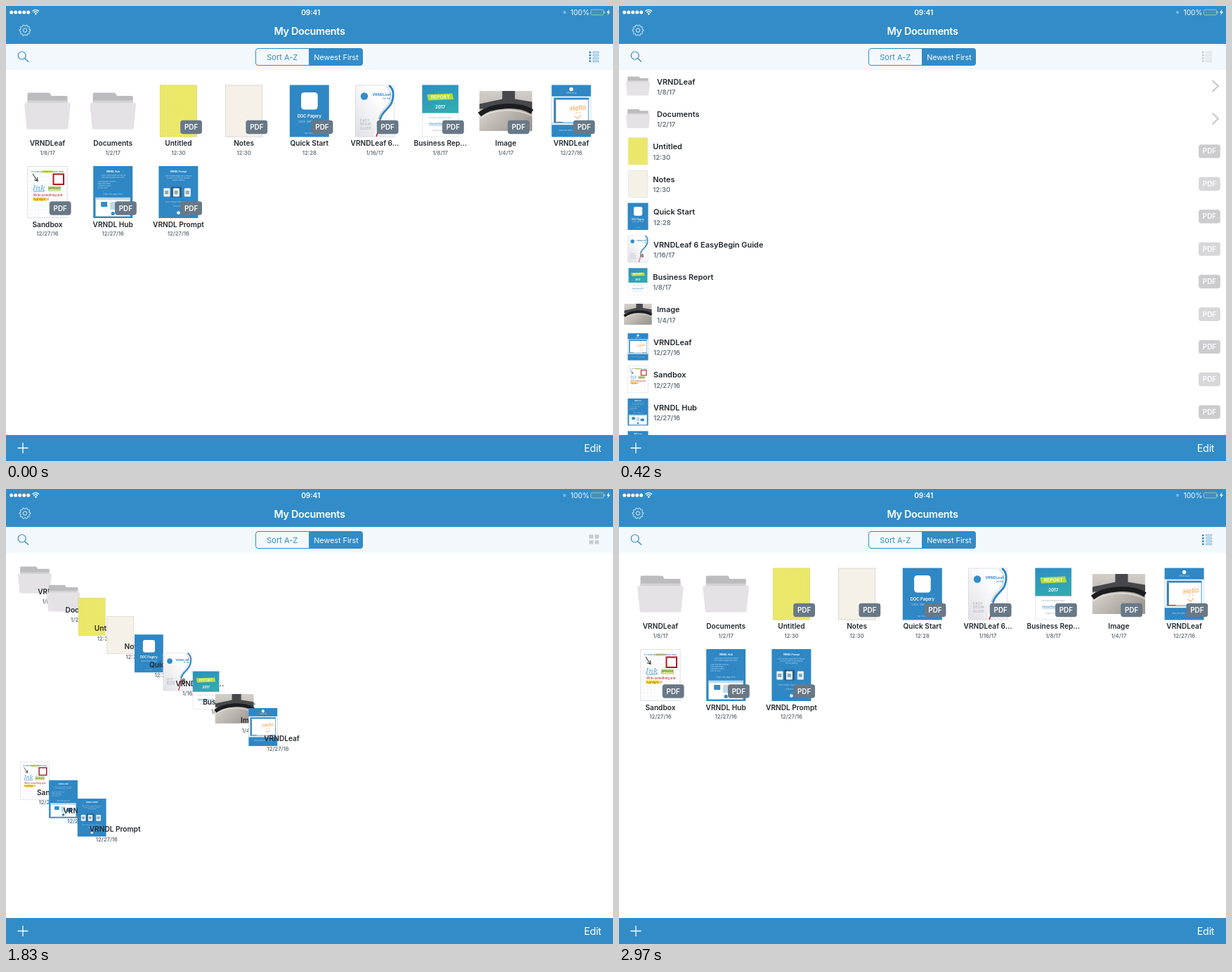
Recreate the animation shown at these times as an HTML page. Size 864 by 648 pixels, loop 3 s.

```html
<!DOCTYPE html>
<html lang="en">
<head>
<meta charset="utf-8">
<title>My Documents</title>
<style>
html, body { margin: 0; width: 100%; height: 100%; overflow: hidden; background: #fff; }
#stage { display: block; width: 864px; height: 648px; font-family: Inter, Roboto, sans-serif; }
.name { font-weight: 600; fill: #24282d; }
.date { font-weight: 600; fill: #69737e; }
</style>
</head>
<body>
<svg id="stage" viewBox="0 0 864 648" xmlns="http://www.w3.org/2000/svg">
  <defs>
    <linearGradient id="teal" x1="0" y1="0" x2=".4" y2="1">
      <stop offset="0" stop-color="#2f8cc6"/><stop offset="1" stop-color="#30aab2"/>
    </linearGradient>
    <linearGradient id="paper" x1="1" y1="0" x2="0" y2="1">
      <stop offset=".3" stop-color="#fff"/><stop offset="1" stop-color="#dfe0e6"/>
    </linearGradient>
    <linearGradient id="wall" x1="0" y1="0" x2="0" y2="1">
      <stop offset="0" stop-color="#d2cec9"/><stop offset="1" stop-color="#a9a29b"/>
    </linearGradient>
    <linearGradient id="dash" x1="0" y1="0" x2="1" y2=".6">
      <stop offset="0" stop-color="#dedad4"/><stop offset="1" stop-color="#a09a94"/>
    </linearGradient>
  </defs>
  <rect width="864" height="648" fill="#fff"/>
  <g id="files"></g>
  <g id="chrome"></g>
</svg>
<script>
const BLUE = '#328cc8', GRAY = '#c9ccce', COVER = '#2f87c4';
const LOOP = 3000, STEP = 30;
const TO_LIST = 90, TO_GRID = 1740;
const $ = id => document.getElementById(id);
const lerp = (a, b, p) => a + (b - a) * p;
const clamp = x => Math.max(0, Math.min(1, x));

// Ease in-out, control points (.42, 0) and (.58, 1)
function ease(x) {
  x = clamp(x);
  let lo = 0, hi = 1;
  for (let i = 0; i < 24; i++) {
    const s = (lo + hi) / 2;
    if (1.26 * s - .78 * s * s + .52 * s ** 3 < x) lo = s; else hi = s;
  }
  return lo * lo * (3 - 2 * lo);
}

// Markup helpers
const rect = (x, y, w, h, fill, more = '') =>
  `<rect x="${x}" y="${y}" width="${w}" height="${h}" fill="${fill}" ${more}/>`;
const dot = (x, y, r, fill) => `<circle cx="${x}" cy="${y}" r="${r}" fill="${fill}"/>`;
const line = (d, color, w, more = '') =>
  `<path d="${d}" fill="none" stroke="${color}" stroke-width="${w}" ${more}/>`;
const text = (s, x, y, size, fill, weight = 400, more = 'text-anchor="middle"') =>
  `<text x="${x}" y="${y}" font-size="${size}" fill="${fill}" font-weight="${weight}" ${more}>${s}</text>`;
const page = (w, fill, edge) => edge
  ? rect(.4 - w / 2, -36.6, w - .8, 73.2, fill, `stroke="${edge}" stroke-width=".8"`)
  : rect(-w / 2, -37, w, 74, fill);
const small = (s, y, size = 2.4, x = 0) => text(s, x, y, size, '#b4d6ee');
const badge = (x, y, fill) =>
  rect(x - 15.4, y - 9.7, 30.8, 19.4, fill, 'rx="3.6"') + text('PDF', x, y + 3.6, 9.9, '#fff', 600);
const rules = (w, gap, color) => {
  let d = '';
  for (let y = -37 + gap; y < 37; y += gap) d += `M${-w / 2} ${y}h${w}`;
  for (let x = -w / 2 + gap; x < w / 2; x += gap) d += `M${x} -37v74`;
  return line(d, color, .4);
};

// Thumbnails, centred on 0,0
const art = {
  folder: () =>
    '<path d="M-28.500-6V-24q0-2 2-2H1.500q2 0 2.500 1.500l.8 2q.5 1 2 1H27q1.500 0 1.500 1.500V-6z" fill="#bcbbbd"/>' +
    rect(-28.5, -15, 57, 5, '#d3d2d4') +
    '<path d="M-31-11.500H31q2 0 1.800 2L29.500 24q-.2 2-2 2H-27.500q-1.800 0-2-2L-32.800-9.500q-.2-2 1.800-2z" fill="#e4e2e4"/>',
  yellow: () => page(53, '#ece96c', '#d8d572') + rules(52, 4, '#e7e366'),
  cream: () => page(53, '#f5f1e7', '#d3d1cb'),
  start: () => page(56, COVER) + rect(-11.7, -26.5, 23.6, 24.5, '#fff', 'rx="4.500"') +
    text('DOC Pagery', 0, 9.5, 5.8, '#fff', 600) + text('Quick Start Guide', 0, 16.6, 3.8, '#a9d0ea') +
    small('Tap to begin', 32),
  guide: () => page(56, 'url(#paper)', '#d6d8dc') +
    line('M19-36.500C28-31 27-20 24-12S9 2 7 13S5 26 1 36.500', '#fff', 5) +
    line('M20-36.500C28-31 27-20 24-12S9 2 7.500 12', '#2f87c4', 3) +
    line('M16-35C24-30 23-21 21-14S7 0 5 12', '#8fa3b5', .7) +
    line('M7.500 12C7 20 6 27 2 36.500', '#b3263c', 1.8) +
    dot(-15, -21, 5.2, BLUE) + text('VRNDLeaf', 9.5, -21.5, 5.2, BLUE, 700) + text('for Tab', 17, -16.5, 3, BLUE, 600) +
    ['EASY', 'BEGIN', 'GUIDE'].map((s, i) => text(s, -21, 15.5 + i * 5.3, 4.8, '#a5a9af', 400, 'letter-spacing=".3"')).join('') +
    text('6', 12, 23, 12, '#23262b', 600),
  report: () => page(51.500, '#fff', '#dcdfe2') + rect(-25.8, -37, 51.600, 40, 'url(#teal)') +
    '<path d="M-19-23.500L17-25l2 8.500L-17-15z" fill="#b5dc3a"/>' +
    text('REPORT', 0, -17.6, 6.800, '#f4ffd0', 600) + text('2017', 0, -3.8, 6.2, '#fff', 700) +
    text('Net growth summary by region', 0, 10.5, 2.2, '#9aa3ab') +
    text('Annual Report 2017', 0, 19.5, 3.4, BLUE, 600) + line('M-15 21h30', BLUE, .4) +
    text('All figures in thousands', 0, 28, 2.2, '#9aa3ab'),
  photo: () => rect(-37.5, -28.5, 75, 57, 'url(#wall)') +
    '<path d="M-5-28.500H13V-17L37.500-13V-3H-37.500V-10L-5-17z" fill="#47484b"/>' +
    '<path d="M-37.500 0C-15-12 20-12 37.500-2V28.500H-37.500z" fill="url(#dash)"/>' +
    line('M-37.500 5C-20-9 18-11 37.500 1', '#1c1d20', 7) + line('M-37.500 11C-20-3 15-5 37.500 7', '#ece7df', 1.2),
  hello: () => page(56, COVER) + dot(0, -31, 2.8, '#fff') + small('VRNDLeaf', -24.7, 3) +
    rect(-28, -20.8, 56, 40.5, '#fff') + rect(-24.5, -18.5, 49, 35, '#fff', `stroke="${COVER}" stroke-width=".9"`) +
    rect(-24.5, -18.5, 49, 2.4, COVER) + rect(-24.5, -16, 2.6, 32, '#337ab0') +
    line('M-28 17.500H28', '#9cc4e0', 1) + line('M-24 16h12M12 16h12', '#264b68', .8) +
    text('Hello', 10, -1, 9.5, '#f09a3c', 400, 'text-anchor="middle" font-style="italic" transform="rotate(-8 10 -1)"') +
    line('M5 7q4 7 8-1', '#f09a3c', 1) + dot(7, 3, .8, '#f09a3c') + dot(12, 2, .8, '#f09a3c') +
    small('Draw and write on any page', 28, 2.7),
  sandbox: () => page(57, '#fff', '#d5d7db') + rules(57, 5.2, '#e9ebf0') +
    rect(-7, -30.8, 14, 3.4, '#f2e93d') + text('Try some annotation features today', 0, -28, 2.700, '#397fae', 600) +
    line('M-21-26L-14.500-16M-19-17.500L-14-15.500L-14.500-21', '#343840', 1.1) +
    rect(8.5, -25.5, 14.5, 14.5, '#fff', 'stroke="#ad1626" stroke-width="2"') +
    text('Ink', -12.5, -2.5, 11.5, '#5fabd8', 400, 'text-anchor="middle" font-style="italic" style="font-family:\'Noto Serif\',serif"') +
    line('M-20-.5L-4-1.500', '#3f9bd1', .8) +
    rect(1.5, -8, 17, 6, '#e0ef9c', 'stroke="#7d9c38" stroke-width=".5"') + text('APPROVED', 10, -3.6, 3, '#4d6a20', 700) +
    text('Write something and', -20, 6.3, 4.2, '#c23b3b', 500, '') +
    rect(-20.5, 7.5, 19, 5, '#f2e93d') + text('highlight it!', -20, 11.5, 4.2, '#b5642b', 500, ''),
  hub: () => page(56, COVER) + text('VRNDL Hub', 0, -28.5, 3.4, '#fff', 700) +
    small('A short look at what you can do', -23) + small('with shared pages and notes', -20) +
    ['Open from any browser', 'Share with teams', 'Comment in place', 'Sync at once'].map((s, i) =>
      text(s, -22, -14 + i * 3.1, 2.3, '#b4d6ee', 400, '')).join('') +
    small('Open the page here', 4, 2.9) + rect(-24.5, 8, 49, 26.5, '#fff', 'stroke="#a8cfe8" stroke-width=".8"') +
    rect(-24.5, 8, 49, 3, '#b9d9ed') + rect(-17, 14, 9, 7, BLUE) + rect(-4, 14, 8, 11, '#bcd9ec') +
    rect(7, 18, 10, 7, BLUE) + dot(0, 30.5, 2.6, BLUE),
  prompt: () => page(56, COVER) + text('VRNDL Prompt', 0, -28.5, 3.2, '#fff', 700) +
    small('Edit the same page with everyone', -22) + small('on every one of your devices', -19) + small('without waiting', -16) +
    rect(-10.5, -7.5, 15, 15, '#245f8b', 'rx="1"') +
    [-21, -7.5, 8.5].map(x => rect(x, -5.500, 9, 12, '#eef4f8', 'rx="1"') + rect(x + 1.8, -2, 5, 5, '#8aa9bf')).join('') +
    small('Every change is kept in one place', 15) + small('Learn more', 21, 2.8) + dot(0, 29.5, 2.3, '#fff')
};

// art, name, date, list indent, name when shortened
const files = [
  ['folder', 'VRNDLeaf', '1/8/17', 54],
  ['folder', 'Documents', '1/2/17', 54],
  ['yellow', 'Untitled', '12:30', 48.3],
  ['cream', 'Notes', '12:30', 48.3],
  ['start', 'Quick Start', '12:28', 49],
  ['guide', 'VRNDLeaf 6 EasyBegin Guide', '1/16/17', 49, 'VRNDLeaf 6...'],
  ['report', 'Business Report', '1/8/17', 48.3, 'Business Rep...'],
  ['photo', 'Image', '1/4/17', 54],
  ['hello', 'VRNDLeaf', '12/27/16', 49],
  ['sandbox', 'Sandbox', '12/27/16', 49],
  ['hub', 'VRNDL Hub', '12/27/16', 49],
  ['prompt', 'VRNDL Prompt', '12/27/16', 49]
];
const ROW = 46.42, COL = 93.2;

$('files').innerHTML = files.map(([kind], i) => `<g id="file${i}"><g class="thumb">${art[kind]()}</g>
  <svg class="box" height="18"><text class="name" y="13"/></svg>
  <svg class="box" height="16"><text class="date" y="12"/></svg>
  ${i < 2 ? line('M-4.500-8L4-0L-4.500 8', '#c6c6c9', 2, 'class="arrow"')
    : `<g class="tag">${badge(0, 0, '#687886')}</g><g class="mark">${badge(840.5, 114 + ROW * i, '#c7c7ca')}</g>`}</g>`).join('');

// A label with a clipping box; sizes are [grid, list]
function label(box, words, sizes) {
  const t = box.firstElementChild;
  const put = k => { t.textContent = words[k]; t.setAttribute('font-size', sizes[k]); };
  const w = [0, 1].map(k => { put(k); return t.getComputedTextLength(); });
  return { box, put, w };
}
const parts = files.map(([, name, date, indent, short], i) => {
  const g = $('file' + i), boxes = g.querySelectorAll('.box'), find = c => g.querySelector(c);
  return {
    thumb: find('.thumb'), arrow: find('.arrow'), tag: find('.tag'), mark: find('.mark'), indent,
    name: label(boxes[0], [short || name, name], [10.15, 10.95]),
    date: label(boxes[1], [date, date], [7.7, 9.4]),
    x: 59 + COL * (i % 9), y: 149.5 + 115.5 * Math.floor(i / 9), row: 114 + ROW * i
  };
});

const teeth = () => {
  let d = '';
  for (let i = 0; i <= 120; i++) {
    const a = i / 120 * Math.PI * 2, r = 6.3 + 1.5 * clamp(.5 + 1.4 * Math.cos(a * 10));
    d += `${i ? 'L' : 'M'}${(27 + r * Math.cos(a)).toFixed(2)} ${(34.6 + r * Math.sin(a)).toFixed(2)}`;
  }
  return d + 'z';
};
const rows = [66, 70.2, 74.4, 78.6];
$('chrome').innerHTML =
  rect(0, 0, 864, 54, BLUE) + rect(0, 54, 864, 37, '#f3f8fc') + rect(0, 611, 864, 37, BLUE) +
  [0, 1, 2, 3, 4].map(i => dot(7.7 + i * 6, 9, 2.5, '#fff')).join('') +
  line('M37.500 7.500Q42.300 3.300 47.100 7.500M39.300 9.400Q42.300 6.800 45.300 9.400', '#fff', 1.3) + dot(42.3, 11.3, 1.3, '#fff') +
  text('09:41', 433.7, 12.6, 10.1, '#fff', 600) +
  dot(795, 9, 2.2, '#78b3dc') + text('100%', 817, 12.7, 10.2, '#fff') +
  rect(832.5, 5.2, 18, 7.6, '#3f92bb', 'rx="1.500" stroke="#a9d5bd" stroke-width=".8"') + rect(851.2, 7.4, 1.2, 3.2, '#a9d5bd') +
  '<path d="M858.500 4.500L855 9.500h2.300L856 13.500L860 8.300h-2.400z" fill="#fff"/>' +
  line(teeth(), '#fff', .9) + '<circle cx="27" cy="34.600" r="2.700" fill="none" stroke="#fff" stroke-width=".9"/>' +
  text('My Documents', 432, 40.7, 14.4, '#fff', 600, 'text-anchor="middle" letter-spacing="-.33"') +
  `<circle cx="22.700" cy="70.500" r="5.500" fill="none" stroke="${BLUE}" stroke-width="1.200"/>` + line('M26.600 74.400L32 79.500', BLUE, 1.4) +
  rect(355.5, 60.5, 152, 24, 'none', `rx="3.500" stroke="${BLUE}"`) +
  `<path d="M431.500 60.500h72.500q3.500 0 3.500 3.500v17q0 3.500-3.500 3.500h-72.500z" fill="${BLUE}" stroke="${BLUE}"/>` +
  text('Sort A-Z', 393.2, 76.5, 11, BLUE) + text('Newest First', 470, 76.5, 10.8, '#fff') +
  `<g id="listIcon">${rows.map(y => rect(830, y - 1.3, 2.6, 2.6, 'currentColor') +
    rect(835.3, y - 1, 8.4, 2, 'none', 'stroke="currentColor" stroke-width=".6" rx=".6"')).join('')}</g>` +
  `<g id="gridIcon">${[[830, 65], [838, 65], [830, 73], [838, 73]].map(([x, y]) => rect(x, y, 6, 5.5, 'currentColor')).join('')}</g>` +
  line('M16.500 629.500h15M24 622v15', '#fff', 1.3) +
  text('Edit', 835, 634.8, 14.4, '#fff', 400, 'text-anchor="middle" letter-spacing="-.25"');

const show = (el, on) => el.setAttribute('visibility', on ? 'visible' : 'hidden');

function place(lab, cx, indent, from, to, base, p) {
  lab.box.setAttribute('x', lerp(cx - lab.w[0] / 2, indent, p));
  lab.box.setAttribute('y', lerp(from, to, p) - base);
  lab.box.setAttribute('width', lerp(lab.w[0], lab.w[1], p) + 1.2);
}

let shown = -1;
function render(ms) {
  const t = Math.floor(ms % LOOP / STEP) * STEP;
  if (t === shown) return;
  shown = t;

  const list = t >= TO_LIST && t < TO_GRID;
  const p = t < TO_GRID ? ease((t - TO_LIST) / 296) : 1 - ease((t - 1694) / 294);
  const tags = t < TO_LIST || t >= 2010;
  const scale = lerp(1, .52, p);

  parts.forEach((f, i) => {
    f.thumb.setAttribute('transform',
      `translate(${lerp(f.x, 27, p)} ${lerp(f.y, f.row, p)}) scale(${scale})`);
    for (const lab of [f.name, f.date]) lab.put(list ? 1 : 0);
    place(f.name, f.x, f.indent, f.y + 49.7, f.row - 2.500, 13, p);
    place(f.date, f.x, f.indent, f.y + 62.2, f.row + 11.9, 12, p);
    if (f.arrow) {
      f.arrow.setAttribute('transform', `translate(${lerp(866 + COL * i, 849, p)} ${lerp(131.3, f.row, p)})`);
      show(f.arrow, list);
    } else {
      f.tag.setAttribute('transform', `translate(${f.x + 18.2} ${f.y + 23})`);
      show(f.tag, tags);
      show(f.mark, list && t >= 390);
      f.mark.setAttribute('opacity', clamp((t - 360) / (i % 2 ? 85 : 66)));
    }
  });

  const gridIcon = t >= 450 && t < 2040;
  const pressed = t >= 30 && t < 450 || t >= TO_GRID && t < 2040;
  show($('gridIcon'), gridIcon);
  show($('listIcon'), !gridIcon);
  $('chrome').setAttribute('color', pressed ? GRAY : BLUE);
}

function tick() {
  render(performance.now());
  requestAnimationFrame(tick);
}
tick();
</script>
</body>
</html>
```
